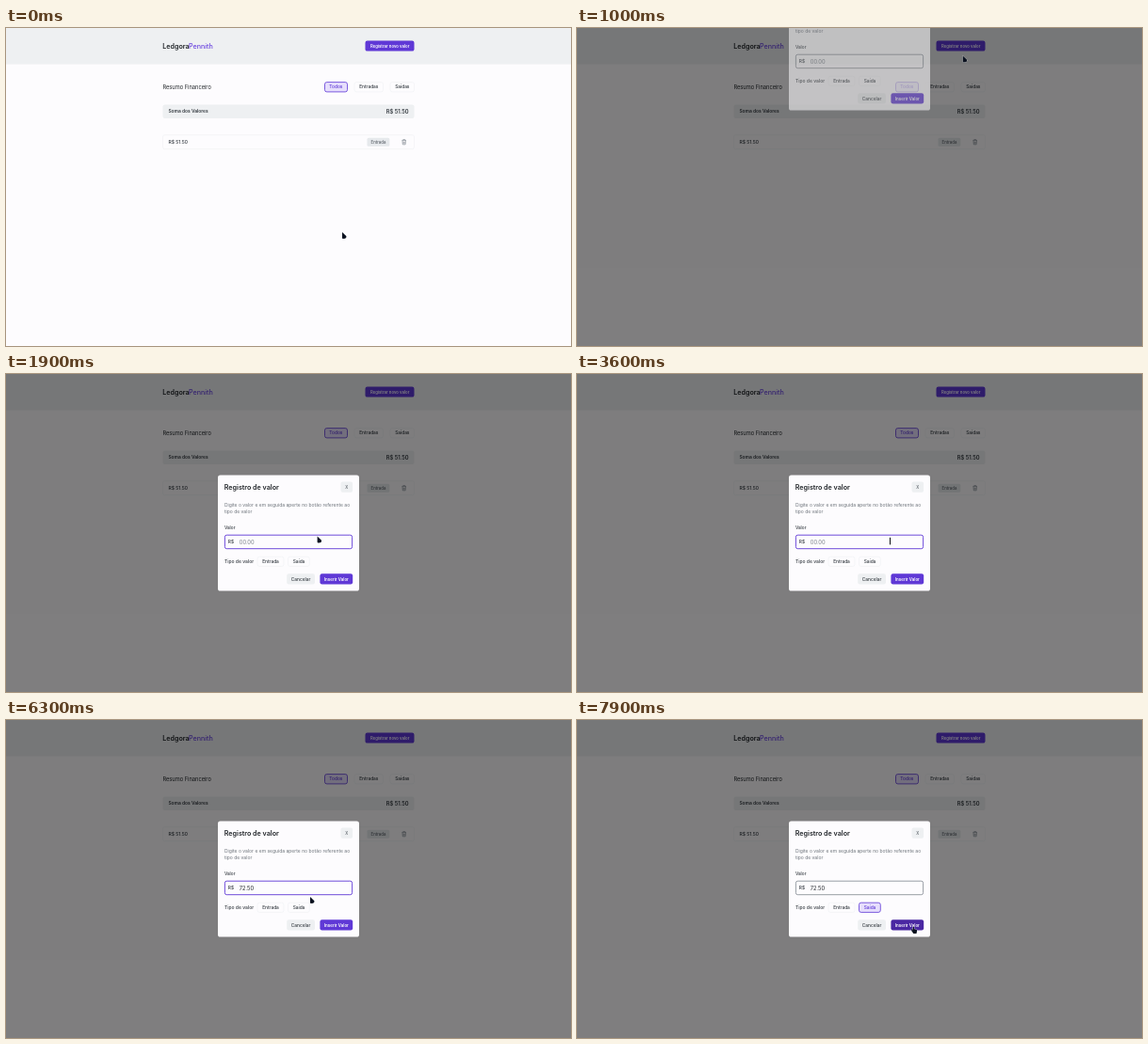
An HTML page for the animation above (8000 ms loop, 600 by 338 pixels).

```html
<!DOCTYPE html>
<html lang="pt-BR">
<head>
<meta charset="utf-8">
<title>Registro de valores</title>
<style>
  html, body { margin: 0; width: 100%; height: 100%; overflow: hidden; background: #fdfcfe; }
  svg { display: block; width: 600px; height: 338px; font-family: Inter, sans-serif; font-weight: 500; fill: #343a40; }
  .big { font-size: 7.14px; font-weight: 600; fill: #212529; }
  .mid { font-size: 5.71px; font-weight: 400; fill: #212529; }
  .sum { font-size: 5.71px; font-weight: 600; }
  .text { font-size: 5px; }
  .chip { font-size: 4.8px; text-anchor: middle; }
  .small { font-size: 4.29px; text-anchor: middle; fill: #5c636a; }
  .soft { font-weight: 400; fill: #6c737a; }
  .bold { font-weight: 600; }
  .white { fill: #fff; }
  .bar { fill: #eef0f2; }
  .line { fill: none; stroke: #f1f2f5; stroke-width: .7; }
  .brand { fill: #5f38d6; }
  .brand.hover { fill: #4a27a2; }
  .picked { fill: #e6defc; stroke: #5f38d6; stroke-width: .8; }
  .purple { fill: #5f38d6; }
  .field { fill: #fdfcfe; stroke: #8d949b; stroke-width: .9; }
  .field.focus { stroke: #5f38d6; }
  .pointer { fill: #0b1220; stroke: #fff; stroke-width: .5; stroke-linejoin: round; paint-order: stroke; }
</style>
</head>
<body>
<svg viewBox="0 0 600 338">
  <rect width="600" height="338" fill="#fdfcfe"/>
  <rect class="bar" width="600" height="38.5"/>
  <text class="big" x="166.3" y="21.6">Ledgora</text>
  <text class="big" x="194" y="21.6" style="fill:#6a45df;font-weight:500">Pennith</text>
  <rect id="open" class="brand" x="381.5" y="13.6" width="52" height="11" rx="2.2"/>
  <text class="small bold white" x="407.7" y="20.9">Registrar novo valor</text>

  <text class="mid" x="166.4" y="64.8">Resumo Financeiro</text>
  <rect class="picked" x="338.5" y="57.6" width="24" height="10.3" rx="2.2"/>
  <text class="chip purple" x="350.4" y="64.4">Todos</text>
  <rect class="line" x="370" y="57.6" width="30.5" height="10.3" rx="2.2"/>
  <text class="chip" x="385.3" y="64.4">Entradas</text>
  <rect class="line" x="408" y="57.6" width="25.5" height="10.3" rx="2.2"/>
  <text class="chip" x="420.8" y="64.4">Saídas</text>

  <rect class="bar" x="166.5" y="81.4" width="267" height="14.6" rx="2"/>
  <text class="text bold" x="172.4" y="90.4" style="font-size:4.9px">Soma dos Valores</text>
  <text class="sum" x="427.6" y="90.7" text-anchor="end">R$ 51.50</text>

  <rect class="line" x="166.5" y="113.7" width="267" height="14.9" rx="2"/>
  <text class="text" x="172.4" y="122.9">R$ 51.50</text>
  <rect x="383.5" y="116.8" width="23.8" height="9" rx="1.5" fill="#e6e9ec"/>
  <text class="small" x="395.5" y="122.9">Entrada</text>
  <g fill="none" stroke="#868e96" stroke-width=".7">
    <path d="M420.4 119.4h4.6M421.8 119.2v-.6h1.8v.6M421 119.6l.3 4.2h2.8l.3-4.2M422.2 120.8v2M423.2 120.8v2"/>
  </g>

  <rect id="shade" width="600" height="338" fill="#000" fill-opacity=".5"/>

  <g id="dialog">
    <rect x="225" y="107.5" width="150" height="123" rx="2.6" fill="#fdfcfe"/>
    <text class="big" x="231.8" y="122.9">Registro de valor</text>
    <rect class="bar" x="355.5" y="114.4" width="12.6" height="11.4" rx="2"/>
    <text class="small" x="361.8" y="121.6">X</text>
    <text class="text soft" x="231.9" y="141">Digite o valor e em seguida aperte no botão referente ao</text>
    <text class="text soft" x="231.9" y="148.4">tipo de valor</text>
    <text class="text" x="231.9" y="165.3" style="font-size:4.7px">Valor</text>
    <rect id="field" class="field" x="232.4" y="171.2" width="135.2" height="14.5" rx="2"/>
    <text class="text" x="235.8" y="180.1" style="font-size:4.8px">R$</text>
    <text id="value" class="mid" x="247.8" y="180.5"></text>
    <rect id="caret" y="175.3" width=".7" height="6.4" fill="#212529"/>
    <text class="text" x="231.9" y="200.7">Tipo de valor</text>
    <rect class="line" x="267" y="194.2" width="28" height="10.2" rx="2.2"/>
    <text class="chip" x="281" y="200.9">Entrada</text>
    <rect id="out" class="line" x="299.5" y="194.2" width="22.8" height="10.2" rx="2.2"/>
    <text id="outText" class="chip" x="311" y="200.9">Saída</text>
    <rect class="bar" x="298.2" y="212.2" width="29.8" height="11.3" rx="2.2"/>
    <text class="chip" x="313.1" y="219.6">Cancelar</text>
    <rect id="insert" class="brand" x="333.4" y="212.2" width="34.8" height="11.3" rx="2.2"/>
    <text class="small bold white" x="350.9" y="219.5" style="font-size:4.45px">Inserir Valor</text>
  </g>

  <g id="cursor">
    <path id="arrow" class="pointer" d="M0 0L4.4 4.2V5.6L3.2 6.7L.6 6.9L0 6.2Z"/>
    <path id="hand" class="pointer" d="M-.5 .3Q0-.3 .6 .3V2.8L3 3.3Q3.8 3.6 3.7 4.6L3.1 7.7H-.1L-2.2 4.7Q-2-.1-.5 4.4Z"/>
    <path id="beam" d="M0-3.8V3.8" stroke="#15181c" stroke-width="1.1"/>
  </g>
</svg>
<script>
  const LOOP = 8000, STEP = 100;
  const $ = id => document.getElementById(id);
  const show = (id, on) => $(id).setAttribute('visibility', on ? 'visible' : 'hidden');
  const between = (t, a, b) => t >= a && t < b;

  // time, x, y, pointer shape
  const moves = [
    [0, 357, 217, 'arrow'], [400, 380, 125, 'arrow'], [800, 411, 27, 'hand'], [900, 412.3, 23.6, 'hand'],
    [1000, 409.7, 29.6, 'arrow'], [1300, 385, 82, 'arrow'], [1600, 342, 158, 'arrow'], [1800, 330.6, 172.6, 'arrow'],
    [2800, 332.5, 177.6, 'beam'], [6100, 332.5, 177.6, 'beam'],
    [6200, 330, 181, 'arrow'], [6400, 316, 195, 'hand'], [6600, 311, 198, 'hand'], [6700, 311, 199, 'hand'],
    [6900, 322, 208, 'arrow'], [7000, 327, 213, 'arrow'],
    [7200, 339, 224, 'arrow'], [7400, 360, 225.5, 'arrow'], [7500, 360, 225.5, 'arrow'],
    [7700, 359, 221.5, 'hand'], [7900, 357.4, 219.4, 'hand']
  ];
  const typed = [[3800, '72'], [5100, '72.'], [5600, '72.5'], [5700, '72.50']];
  const caretOn = [[2800, 3600], [3800, 4400], [4900, 6200]];

  function pointerAt(t) {
    let i = moves.length - 1;
    while (moves[i][0] > t) i--;
    const a = moves[i], b = moves[i + 1] || a;
    // A change of shape while resting happens at once
    const still = a[0] === 1800;
    const k = still || a === b ? 0 : (t - a[0]) / (b[0] - a[0]);
    return { x: a[1] + (b[1] - a[1]) * k, y: a[2] + (b[2] - a[2]) * k, kind: a[3] };
  }

  function draw(t) {
    const p = pointerAt(t);
    $('cursor').setAttribute('transform', `translate(${p.x} ${p.y})`);
    ['arrow', 'hand', 'beam'].forEach(k => show(k, k === p.kind));

    const opened = t >= 1000;
    const left = Math.max(0, 1 - (t - 1000) / 400);
    show('shade', opened);
    $('dialog').style.display = opened ? '' : 'none';
    $('dialog').setAttribute('transform', `translate(0 ${-143 * left * left})`);
    $('dialog').setAttribute('opacity', 1 - .45 * left);

    const entry = typed.filter(e => e[0] <= t).pop();
    const value = $('value');
    value.textContent = entry ? entry[1] : '00.00';
    value.style.fill = entry ? '#212529' : '#7d848b';
    show('caret', caretOn.some(c => between(t, c[0], c[1])));
    $('caret').setAttribute('x', 247.7 + (entry ? value.getComputedTextLength() : 0));

    const picked = t >= 6600;
    $('field').classList.toggle('focus', between(t, 1800, 6600));
    $('out').setAttribute('class', picked ? 'picked' : 'line');
    $('outText').classList.toggle('purple', picked);
    $('open').classList.toggle('hover', between(t, 800, 1000));
    $('insert').classList.toggle('hover', t >= 7700);
  }

  const start = performance.now();
  let last = -1;
  function tick() {
    const t = Math.floor((performance.now() - start) % LOOP / STEP) * STEP;
    if (t !== last) draw(last = t);
    requestAnimationFrame(tick);
  }
  tick();
</script>
</body>
</html>
```
